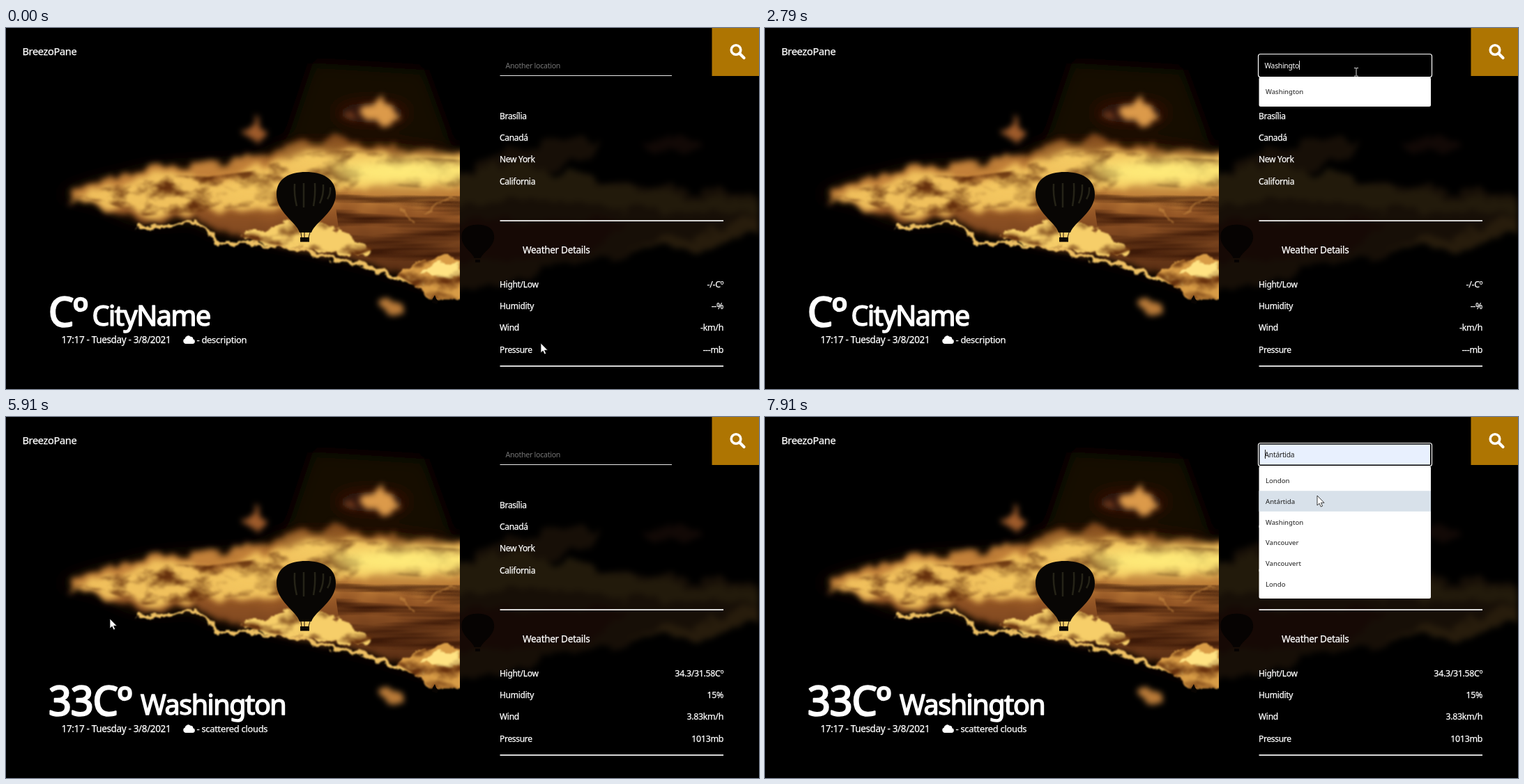
Animation of 1080x519 px, one loop 8000 ms. Source, as an HTML page:

```html
<!DOCTYPE html>
<html lang="en">
<head>
<meta charset="utf-8">
<title>Weather dashboard</title>
<style>
  html, body { margin: 0; width: 100%; height: 100%; overflow: hidden; background: #000; }
  svg { position: absolute; left: 0; top: 0; width: 1080px; height: 519px; display: block; }
  #photo { will-change: transform; }
  text { font-family: "Noto Sans", "Open Sans", sans-serif; fill: #fff; letter-spacing: -.025em; white-space: pre; }
  .bold { stroke: #fff; stroke-width: .25px; }
  .item { font-size: 12px; }
  .value { font-size: 12.4px; text-anchor: end; }
  #temp, #city { stroke: #fff; stroke-linejoin: round; }
  #temp { font-size: 57.5px; stroke-width: 2.4px; letter-spacing: -.02em; }
  #city { font-size: 39.5px; stroke-width: 1.5px; letter-spacing: -.037em; }
  #list text { font-size: 9.6px; fill: #1c1c1c; letter-spacing: 0; }
</style>
</head>
<body>
<svg id="photo" viewBox="0 0 1080 519">
  <defs>
    <linearGradient id="sky" gradientUnits="userSpaceOnUse" x1="0" y1="160" x2="0" y2="375">
      <stop offset="0" stop-color="#7a4419"/>
      <stop offset=".2" stop-color="#c4823a"/>
      <stop offset=".38" stop-color="#bd7c37"/>
      <stop offset=".5" stop-color="#935525"/>
      <stop offset=".7" stop-color="#74401c"/>
      <stop offset="1" stop-color="#4a230e"/>
    </linearGradient>
    <filter id="haze" filterUnits="userSpaceOnUse" x="0" y="0" width="1080" height="519" color-interpolation-filters="sRGB">
      <feTurbulence type="fractalNoise" baseFrequency=".03" numOctaves="4" seed="8" result="n"/>
      <feDisplacementMap in="SourceGraphic" in2="n" scale="34" xChannelSelector="R" yChannelSelector="G"/>
      <feGaussianBlur stdDeviation="4.5"/>
    </filter>
    <filter id="crisp" filterUnits="userSpaceOnUse" x="0" y="0" width="1080" height="519" color-interpolation-filters="sRGB">
      <feTurbulence type="fractalNoise" baseFrequency=".06" numOctaves="4" seed="3" result="n"/>
      <feDisplacementMap in="SourceGraphic" in2="n" scale="18" xChannelSelector="R" yChannelSelector="G"/>
      <feGaussianBlur stdDeviation="1.1"/>
    </filter>
    <filter id="shade" filterUnits="userSpaceOnUse" x="0" y="0" width="1080" height="519" color-interpolation-filters="sRGB">
      <feTurbulence type="fractalNoise" baseFrequency=".02 .035" numOctaves="5" seed="21"/>
      <feColorMatrix values="0 0 0 0 .4  0 0 0 0 .19  0 0 0 0 .05  3.6 0 0 0 -1.6"/>
      <feComposite in2="SourceGraphic" operator="in"/>
      <feGaussianBlur stdDeviation="1.5"/>
    </filter>
    <filter id="streaks" filterUnits="userSpaceOnUse" x="0" y="0" width="1080" height="519" color-interpolation-filters="sRGB">
      <feTurbulence type="fractalNoise" baseFrequency=".004 .06" numOctaves="3" seed="5"/>
      <feColorMatrix values="0 0 0 0 .24  0 0 0 0 .1  0 0 0 0 .03  3 0 0 0 -1.2"/>
      <feComposite in2="SourceGraphic" operator="in"/>
    </filter>
    <filter id="soft" filterUnits="userSpaceOnUse" x="0" y="0" width="1080" height="519"><feGaussianBlur stdDeviation="11"/></filter>
    <clipPath id="left"><path d="M0 0H651V519H0Z"/></clipPath>
    <clipPath id="right"><path d="M651 0H1080V519H651Z"/></clipPath>
    <path id="band" d="M78 240Q120 220 165 213Q205 199 260 197L335 194Q375 182 405 166Q450 158 495 163Q560 172 690 184V366H600L520 338L430 316L355 300L305 295L265 274Q215 282 180 274Q150 262 130 251Z"/>
    <path id="bank" d="M90 240L165 224L215 210L290 214L350 206L400 186L450 176L510 176L570 184L690 192V230L600 230L530 224L470 238L400 256L335 258L270 266L195 270L150 254Z"/>
    <path id="heap" d="M335 299L365 290L400 280L420 270L465 284L496 302L526 318L505 327L440 318L380 311Z"/>
    <path id="corner" d="M560 354L598 334L632 328L674 346V390H608L588 372Z"/>
    <path id="envelope" d="M421 294C416 278 388 265 388 239C388 216 407 207 430 207C453 207 473 216 473 239C473 265 444 278 438 294Z"/>
  </defs>

  <g clip-path="url(#left)">
    <g filter="url(#soft)">
      <use href="#band" fill="#5b2a0c" opacity=".5"/>
      <path d="M440 50L600 60L640 170H400Z" fill="#160903"/>
      <ellipse cx="525" cy="122" rx="50" ry="14" fill="#4a200c" opacity=".7"/>
    </g>
    <use href="#band" fill="url(#sky)" filter="url(#haze)"/>
    <path d="M470 236H651V350H560L480 310Z" filter="url(#streaks)"/>
    <g filter="url(#haze)">
      <use href="#bank" fill="#f0c05c"/>
      <path d="M340 148L357 128L376 148L360 166Z" fill="#a05c2b"/>
      <path d="M508 122L536 102L566 128L540 138Z" fill="#dc9a4a"/>
      <path d="M474 129L494 118L502 132Z" fill="#8a4822"/>
      <path d="M534 396L556 386L574 402L552 413Z" fill="#b97a38"/>
    </g>
    <use href="#bank" filter="url(#shade)"/>
    <g filter="url(#soft)">
      <ellipse cx="575" cy="207" rx="110" ry="17" fill="#ffee7c"/>
      <ellipse cx="440" cy="190" rx="45" ry="11" fill="#f8d268" opacity=".7"/>
      <ellipse cx="350" cy="236" rx="50" ry="13" fill="#f7cc63" opacity=".7"/>
    </g>
    <g filter="url(#crisp)">
      <use href="#heap" fill="#f6ce69"/>
      <use href="#corner" fill="#d89c46"/>
      <path d="M594 350L616 338L648 340L655 356L620 362Z" fill="#ffe383"/>
      <path d="M562 258L578 272L588 280M600 268L620 252L645 240" fill="none" stroke="#c98a42" stroke-width="3" opacity=".6"/>
      <path d="M186 287L232 285L262 276L286 290L306 309L345 308L430 320L510 341L552 356L600 366" fill="none" stroke="#eec062" stroke-width="5"/>
    </g>
    <g filter="url(#shade)">
      <use href="#heap"/>
      <use href="#corner"/>
    </g>
    <path d="M611 395L612 389L615 384L617 389L620 393L618 397Z" fill="#080402"/>
    <use href="#envelope" fill="#080604"/>
    <path d="M414 224Q413 240 417 256M427 223V258M443 223Q444 240 441 256M455 225Q456 240 450 252M465 229Q466 238 461 246" fill="none" stroke="#3a3724" stroke-width="2.500" opacity=".6"/>
    <path d="M423 294L424 301M428 294V301M436 294L434 301" stroke="#1a1008" fill="none"/>
    <path d="M422 301H435V307.500H422Z" fill="#0b0704"/>
  </g>

  <g clip-path="url(#right)">
    <g filter="url(#haze)">
      <path d="M640 222L700 180L790 162L850 160L838 182L770 210L900 222L1090 242V278L1010 322L930 312L860 334L790 340L720 366L640 384Z" fill="#170f07"/>
      <path d="M640 215L720 190L780 205L860 222L960 238L1090 250V268L940 262L780 250L640 250Z" fill="#221a0b"/>
      <path d="M640 275H900L830 322L640 338Z" fill="#160905"/>
      <path d="M890 314L990 298L1090 268V284L1010 322Z" fill="#271c0c"/>
      <path d="M910 166L996 160L1000 176L930 178Z" fill="#120906"/>
    </g>
    <use href="#envelope" transform="translate(440 169) scale(.55)" fill="#060302"/>
    <path d="M673 333H680V337H673Z" fill="#060302"/>
  </g>
</svg>

<svg id="ui" viewBox="0 0 1080 519">
  <text class="bold" x="23.500" y="39" font-size="14.600">BreezoPane</text>
  <path d="M1012.500 0H1080V69H1012.500Z" fill="#ae7502"/>
  <g fill="none" stroke="#fff">
    <circle cx="1047" cy="31.500" r="6.800" stroke-width="3.600"/>
    <path d="M1052 36.500L1058.500 43" stroke-width="4.200" stroke-linecap="round"/>
  </g>

  <text id="temp" x="61" y="429"></text>
  <text id="city" y="428"></text>
  <text class="bold" x="79.500" y="453" font-size="13.500">17:17 - Tuesday - 3/8/2021</text>
  <path d="M258 454A3.900 3.900 0 0 1 256.700 446.500A4.600 4.600 0 0 1 264.500 443.700A3.200 3.200 0 0 1 268.300 447.300A3.400 3.400 0 0 1 267.700 454Z" fill="#fff"/>
  <text id="desc" class="bold" x="273.500" y="453" font-size="13"></text>

  <g id="rows" class="bold"></g>
  <text class="bold" x="741" y="324" font-size="13.600">Weather Details</text>
  <path d="M708.500 276.300H1029V277.900H708.500ZM708.500 485.300H1029V486.900H708.500Z" fill="#f4f4f4"/>

  <path id="underline" d="M708.500 68.500H955" stroke="#e8e8e8"/>
  <rect id="ring" x="707.500" y="37.500" width="249" height="33" rx="3" fill="#000" stroke="#fff" stroke-width="1.200"/>
  <rect id="fill" x="709.500" y="39.500" width="244.500" height="29" fill="#e8f0fe"/>
  <text id="field" x="716.500" y="58"></text>
  <path id="caret" d="M0 47V60"/>
  <g id="list">
    <rect id="sheet" x="708.500" y="70.500" width="246.500" rx="2.500" fill="#fff"/>
    <rect id="hover" x="708.500" width="246.500" height="29.600" fill="#d8e1ea"/>
  </g>

  <path id="arrow" d="M0 0V14L3.200 11.200L5.300 16L7.600 15L5.500 10.300H10Z" fill="#fff" stroke="#111" stroke-width=".8"/>
  <path id="beam" d="M-3 -5.500H-.8L0 -5L.8 -5.500H3M0 -5V5.500M-3 6H-.8L0 5.500L.8 6H3" fill="none" stroke="#d8d8d8"/>
</svg>

<script>
const LOOP = 8000;
const $ = id => document.getElementById(id);

function addText(parent, x, y, cls, str) {
  const el = document.createElementNS("http://www.w3.org/2000/svg", "text");
  el.setAttribute("x", x);
  el.setAttribute("y", y);
  if (cls) el.setAttribute("class", cls);
  el.textContent = str;
  parent.append(el);
  return el;
}
const show = (el, on) => el.setAttribute("visibility", on ? "visible" : "hidden");
const setText = (el, str) => { if (el.textContent !== str) el.textContent = str; };
const place = (el, x, y) => el.setAttribute("transform", `translate(${x.toFixed(1)} ${y.toFixed(1)})`);

const rowY = i => 131 + 31.2 * i;
["Brasília", "Canadá", "New York", "California"].forEach((s, i) => addText($("rows"), 708, rowY(i), "item", s));
const values = ["Hight/Low", "Humidity", "Wind", "Pressure"].map((s, i) => {
  addText($("rows"), 708, rowY(i) + 242, "item", s);
  return addText($("rows"), 1029, rowY(i) + 242, "value", "");
});

const options = ["London", "Antártida", "Washington", "Vancouver", "Vancouvert", "Londo"];
const optionEls = options.map(s => addText($("list"), 718, 0, "", s));

const before = { temp: "Cº", city: "CityName", x: 123.5, desc: "- description", values: ["-/-Cº", "--%", "-km/h", "---mb"] };
const after = { temp: "33Cº", city: "Washington", x: 193, desc: "- scattered clouds", values: ["34.3/31.58Cº", "15%", "3.83km/h", "1013mb"] };

// [time, letters typed]
const typing = [[1490, 1], [1690, 2], [1890, 3], [2090, 4], [2390, 5], [2490, 6], [2790, 9], [2890, 10]];

// Pointer strokes: first step, last step, number of steps, way points
const moves = [
  [100, 870, 9, [[767, 453], [680, 390], [586, 300], [700, 195], [870, 155], [921, 105], [848, 63]]],
  [3990, 4690, 8, [[848, 63], [790, 88], [690, 130], [541, 174]]],
  [4790, 5510, 8, [[541, 174], [400, 235], [250, 330], [200, 400], [260, 424], [326, 426]]],
  [5610, 5910, 4, [[326, 426], [210, 445], [141, 330], [160, 255], [149, 290]]],
  [6060, 6810, 9, [[149, 290], [260, 249], [430, 330], [640, 442], [850, 420], [945, 366]]],
  [6910, 7410, 6, [[945, 366], [905, 250], [860, 130], [827, 56]]],
  [7820, 7910, 2, [[827, 56], [808, 87], [792, 113]]]
];

// Catmull-Rom through the way points
function along(pts, u) {
  const last = pts.length - 1;
  const s = u * last, i = Math.min(Math.floor(s), last - 1), f = s - i;
  const at = k => pts[Math.max(0, Math.min(last, k))];
  return [0, 1].map(d => {
    const [a, b, c, e] = [-1, 0, 1, 2].map(k => at(i + k)[d]);
    return b + f / 2 * (c - a + f * (2 * a - 5 * b + 4 * c - e + f * (3 * (b - c) + e - a)));
  });
}

function pointer(t) {
  const move = moves.filter(m => t >= m[0]).pop();
  if (!move) return moves[0][3][0];
  const [start, end, n, pts] = move;
  const step = Math.floor((t - start) / (end - start) * (n - 1) + 1e-6) + 1;
  return along(pts, Math.min(n, step) / n);
}

function drawList(items, hovered) {
  $("sheet").setAttribute("height", items.length * 29.6 + 12.9);
  options.forEach((s, i) => {
    const row = items.indexOf(s);
    show(optionEls[i], row >= 0);
    optionEls[i].setAttribute("y", 95.3 + 29.65 * row);
  });
  show($("sheet"), items.length > 0);
  show($("hover"), hovered >= 0);
  $("hover").setAttribute("y", 76.6 + 29.6 * hovered);
}

function render(t) {
  const data = t < 3890 ? before : after;
  setText($("temp"), data.temp);
  setText($("city"), data.city);
  $("city").setAttribute("x", data.x);
  setText($("desc"), data.desc);
  values.forEach((el, i) => setText(el, data.values[i]));

  const focused = (t >= 990 && t < 4590) || t >= 7510;
  const hovered = t >= 7910 ? 1 : t >= 7820 ? 0 : -1;
  const preview = hovered >= 0;
  const key = t < 3890 ? typing.filter(k => t >= k[0]).pop() : null;
  const typed = preview ? options[hovered] : key ? "Washington".slice(0, key[1]) : "";

  show($("underline"), !focused);
  show($("ring"), focused);
  show($("fill"), preview);
  const field = $("field");
  setText(field, typed || "Another location");
  field.style.fontSize = typed ? "10.3px" : "10.6px";
  field.style.fill = preview ? "#222" : typed ? "#fff" : "#757575";

  show($("caret"), (t >= 990 && t < 3390) || t >= 7510);
  $("caret").setAttribute("stroke", preview ? "#222" : "#ddd");
  place($("caret"), key ? Math.round(716.5 + field.getComputedTextLength()) + .5 : 717.5, 0);

  let items = [];
  if ((t >= 990 && t < 1490) || t >= 7510) items = options;
  else if (t >= 1490 && t < 2890) items = ["Washington"];
  drawList(items, hovered);

  const [x, y] = pointer(t);
  const inField = x > 708 && x < 956 && y > 37 && y < 70;
  show($("beam"), inField);
  show($("arrow"), !inField);
  place($("beam"), Math.round(x), Math.round(y));
  place($("arrow"), x, y);
}

function tick() {
  render(performance.now() % LOOP);
  requestAnimationFrame(tick);
}
tick();
</script>
</body>
</html>
```
